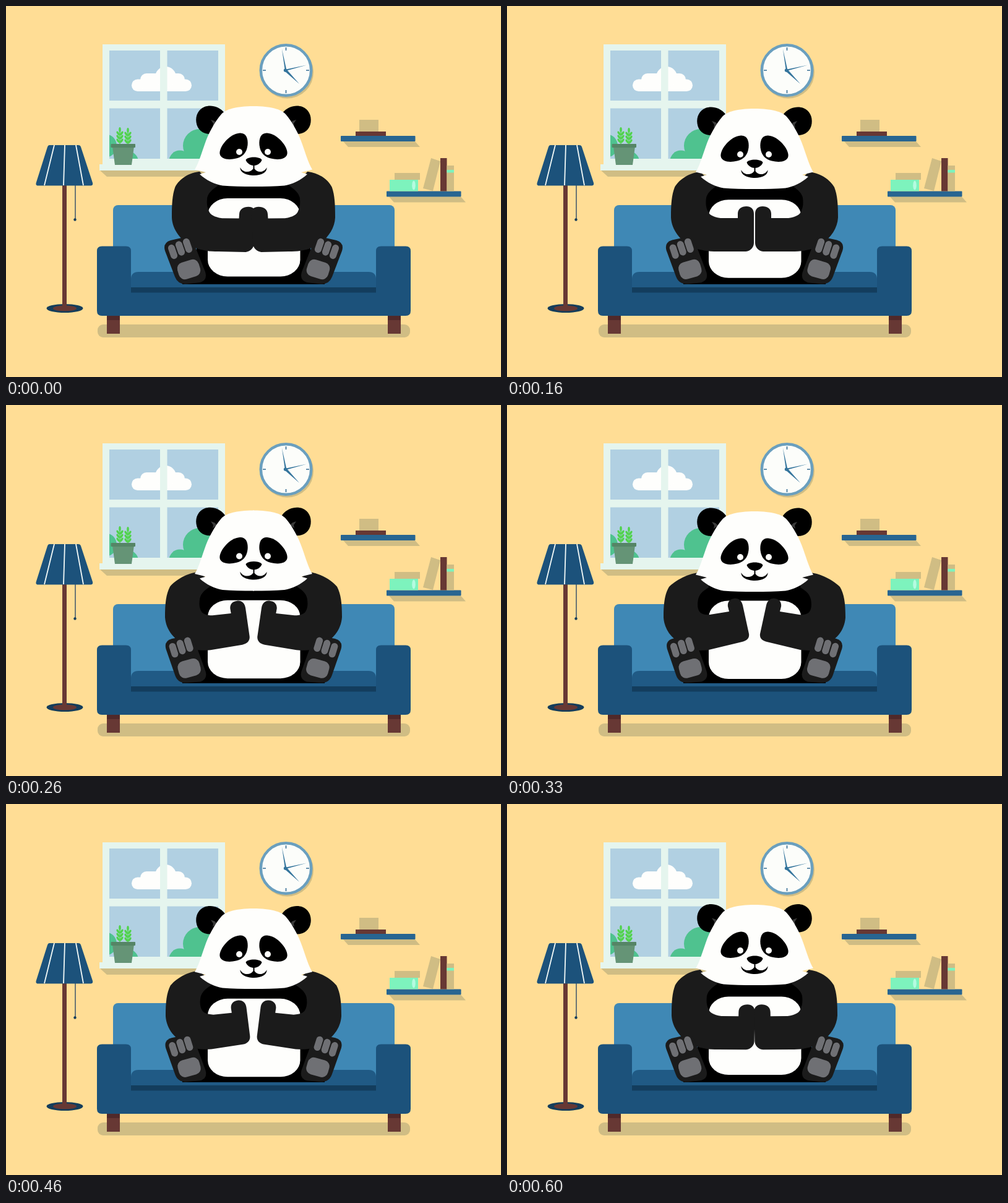
These frames come from a looping animation (800 by 600 pixels, 0.63 s). An HTML page:

```html
<!DOCTYPE html>
<html lang="en">
<head>
<meta charset="utf-8">
<title>Clapping panda</title>
<style>
html, body { margin: 0; width: 100%; height: 100%; overflow: hidden; background: #ffdd95 }
svg { display: block }
.shade { fill: #d0bd84 }
.blue { fill: #1c527b }
.wood { fill: #673834 }
.mint { fill: #7df3bd }
.frame { fill: #e5f5ee }
.bush { fill: #4fc28f }
.white { fill: #fefefc }
.coat { fill: #1b1b1b }
.pad { fill: #6f7074 }
</style>
</head>
<body>
<svg width="800" height="600" viewBox="0 0 800 600">
  <!-- window -->
  <path class="shade" d="M152 266H330V276H163Z"/>
  <rect class="frame" x="156" y="62" width="198" height="195"/>
  <svg x="167" y="72" width="176" height="175" viewBox="167 72 176 175">
    <rect x="167" y="72" width="176" height="175" fill="#b1d0e2"/>
    <g class="white">
      <rect x="203" y="118.500" width="97" height="19.500" rx="9.700"/>
      <rect x="217" y="109" width="72" height="27" rx="10"/>
      <circle cx="258" cy="115" r="17"/>
    </g>
    <g class="bush">
      <circle cx="160" cy="226" r="19"/>
      <circle cx="197" cy="252" r="17"/>
      <circle cx="313" cy="226" r="27"/>
      <circle cx="281" cy="251" r="17.500"/>
    </g>
    <path class="frame" d="M249 72H260.500V153H343V165.500H260.500V247H249V165.500H167V153H249Z"/>
  </svg>
  <rect class="frame" x="151" y="256" width="208" height="10"/>
  <g id="plant" fill="#50d34c"></g>
  <path fill="#659476" d="M172 227H207L203 257H176Z"/>
  <rect x="169.500" y="223" width="39.500" height="6" rx="1" fill="#558566"/>

  <!-- clock -->
  <circle class="shade" cx="454.500" cy="107" r="42.500"/>
  <circle cx="452.500" cy="104" r="40.700" fill="#fcfdfa" stroke="#6a9fbe" stroke-width="4.500"/>
  <path stroke="#376f94" stroke-width="1.600" d="M452.500 67v5M452.500 136v5M415 104h5M485 104h5"/>
  <g fill="#33749c">
    <path d="M445.800 69L453.500 104L451 105Z"/>
    <path d="M486 95.500L450 105.500L450 103Z"/>
    <path d="M474 126L450 105L453 102Z"/>
    <circle cx="451.500" cy="104" r="2.700"/>
  </g>

  <!-- shelves -->
  <g id="shelf">
    <path class="shade" d="M545 219H661L669 228H553Z"/>
    <rect x="541" y="210" width="120.500" height="9" rx="1" fill="#286591"/>
  </g>
  <use href="#shelf" x="74" y="89.500"/>
  <rect class="shade" x="571" y="184" width="31" height="19"/>
  <rect class="wood" x="565" y="203" width="49" height="7"/>
  <rect class="shade" x="628" y="270" width="41" height="11"/>
  <rect class="mint" x="620" y="281" width="46" height="18.500"/>
  <ellipse cx="659" cy="290" rx="2.800" ry="7.500" fill="#b5fbe0"/>
  <path class="shade" d="M687 246L702 251L690 299L674 295Z"/>
  <rect class="wood" x="702" y="246" width="10.500" height="53.500"/>
  <rect class="shade" x="712.500" y="258" width="11.500" height="41.500"/>
  <rect class="mint" x="712.500" y="265" width="11.500" height="4.500"/>

  <!-- lamp -->
  <rect class="wood" x="91" y="288" width="7" height="200"/>
  <ellipse cx="95" cy="489" rx="29.500" ry="7" fill="#153d5b"/>
  <ellipse class="wood" cx="95" cy="489" rx="19" ry="4.500"/>
  <rect class="wood" x="91" y="470" width="7" height="18"/>
  <path stroke="#38536a" stroke-width="1.500" d="M112 288V344"/>
  <circle cx="111.500" cy="345.500" r="2.200" fill="#153d5b"/>
  <path class="blue" d="M70 225H117Q120 225 121 228L140 286Q141 290.500 137 290.500H52Q47 290.500 49 285L67 228Q68 225 70 225Z"/>
  <path stroke="#f3faf8" stroke-width="1.800" d="M78 225L62 290M95 225L93 290M113 225L125 290"/>

  <!-- sofa -->
  <rect class="shade" x="148" y="515" width="505" height="21" rx="9"/>
  <g id="leg">
    <rect class="wood" x="163" y="500" width="21" height="30"/>
    <rect x="163" y="500" width="21" height="8" fill="#50292a"/>
  </g>
  <use href="#leg" x="454"/>
  <rect x="173" y="322" width="455" height="130" rx="8" fill="#3f88b5"/>
  <path fill="#205a85" d="M202 456V442Q202 430 214 430H586Q598 430 598 442V456Z"/>
  <path class="blue" d="M155 388.500H194Q202 388.500 202 396V463H598V396Q598 388.500 606 388.500H646Q654 388.500 654 396V493Q654 501 646 501H155Q147 501 147 493V396Q147 388.500 155 388.500Z"/>
  <rect x="202" y="455" width="396" height="8.500" fill="#133d5d"/>

  <!-- panda -->
  <path d="M308 280H492V400L515 440V450H285V440L308 400Z"/>
  <rect id="belly" class="white" x="326" y="311" width="149.500" height="126.500" rx="32" ry="27"/>
  <g id="side">
    <g id="ear">
      <path d="M354 174C344 161 330 160 321 163C311 167 306 177 307.500 188C309 200 318 207 330 207L345 200Z"/>
      <path fill="#3a3a3a" d="M331 184L337 186L341 190L334 195L335 190Z"/>
    </g>
    <path id="arm" class="coat"/>
    <g id="foot">
      <path class="coat" d="M266 379L288 374Q299 372 303 382L322 430Q326 443 314 447L293 449.500Q278 451 273 438L257 396Q253 383 266 379Z"/>
      <rect class="pad" x="277.500" y="412" width="36" height="28" rx="10" transform="rotate(-17 295.500 426)"/>
      <rect id="toe" class="pad" x="264" y="385.500" width="11" height="24" rx="5.500" transform="rotate(-19 269.500 397.500)"/>
      <use href="#toe" x="12" y="-5.500"/>
      <use href="#toe" x="24" y="-10"/>
    </g>
  </g>
  <use href="#side" transform="translate(800) scale(-1 1)"/>
  <g id="head">
    <g id="cheek">
      <path class="white" d="M401 162H400C372 162 355 167 348 175C337 188 327 206 321 224C315 241 311 255 305 264.500L323 269L313 272C323 281.500 337 288.500 350 290.500Q372 292 401 292Z"/>
      <path d="M378 205.500C388 205 391.500 214 390.500 225C389 238 382 244 372 246.500C360 249.500 347 248 345.500 239C344 228 361 206.500 378 205.500Z"/>
      <circle class="white" cx="377" cy="236" r="5"/>
    </g>
    <use href="#cheek" transform="translate(800) scale(-1 1)"/>
    <path d="M387.500 249C390 243 411 243 413.500 249C412 254 406 258 400.500 258C395 258 389 254 387.500 249Z"/>
    <path d="M399.500 257H401.500V263C404 267 408 268.500 412 268C417 267.500 420 264 421.500 261C422 269 413 274 400.500 274C388 274 378 269 378.500 261C380 264 383 267.500 388 268C393 268.500 397 267 399.500 263Z"/>
  </g>
</svg>
<script>
const $ = id => document.getElementById(id);

// Same outline with the palms together and apart
const shut = "M325 280L312 268C290 271 277 283 271 293C266 306 265 320 265 342C266 362 280 380 300 390C315 396 325 397 340 397L386 397C394 396 399 390 399 383L399 336C399 328 394 324 387 324C379 324 373 328 373 336L373 343L345 343C332 341 327 337 325 333C321 325 321 318 322 310C324 302 330 297 340 290Z";
const open = "M325 280L309 271C288 274 270 286 262 294C255 306 253 320 253 344C255 366 268 380 290 391C300 397 310 398 326 396L380 383C388 381 392 377 391 370L381 324C379 316 374 312 367 313C360 314 356 319 357 326L359 334L328 339C318 340 313 337 311 334C307 328 308 320 309 314C311 306 316 301 326 295Z";
const openPts = open.match(/\d+/g);

function armPath(k) {
  let i = 0;
  const ky = Math.max(k, k / 4); // palms slide sideways when pressed together
  return shut.replace(/\d+/g, n => {
    const f = i % 2 ? ky : k;
    return (+n + (openPts[i++] - n) * f).toFixed(2);
  });
}

// [start ms, head drop, elbow spread]
const poses = [
  [0, 0, 3], [60, -.5, .5], [100, 0, 0], [130, 1.7, 2.5], [160, 4, 6],
  [200, 6.3, 10], [260, 8.5, 14], [330, 10, 18], [360, 10, 18], [400, 9.3, 16.5],
  [460, 7, 13], [500, 4.8, 10], [530, 2.9, 7.5], [600, 1, 5]
];

function leaf(x, y, angle) {
  return `<ellipse cx="${x}" cy="${y}" rx="1.8" ry="4" transform="rotate(${angle} ${x} ${y})"/>`;
}
$("plant").innerHTML = [[184, 200], [197, 201]].map(([x, y]) =>
  `<rect x="${x - .7}" y="${y}" width="1.400" height="${224 - y}"/>` + leaf(x, y, 0) +
  [6, 12, 18].map(d => leaf(x - 2.8, y + d, -35) + leaf(x + 2.8, y + d, 35)).join("")
).join("");

function draw(now) {
  const t = now % 630;
  const [, drop, spread] = poses.findLast(p => p[0] <= t);
  const shift = (id, y) => $(id).setAttribute("transform", `translate(0 ${y})`);
  shift("head", drop);
  shift("ear", drop * .5);
  shift("belly", drop * .55);
  $("foot").setAttribute("transform", `rotate(${drop * .2} 300 447)`);
  $("arm").setAttribute("d", armPath((spread - 6) / 12));
}

const start = performance.now();
function tick() {
  draw(performance.now() - start);
  requestAnimationFrame(tick);
}
tick();
</script>
</body>
</html>
```
